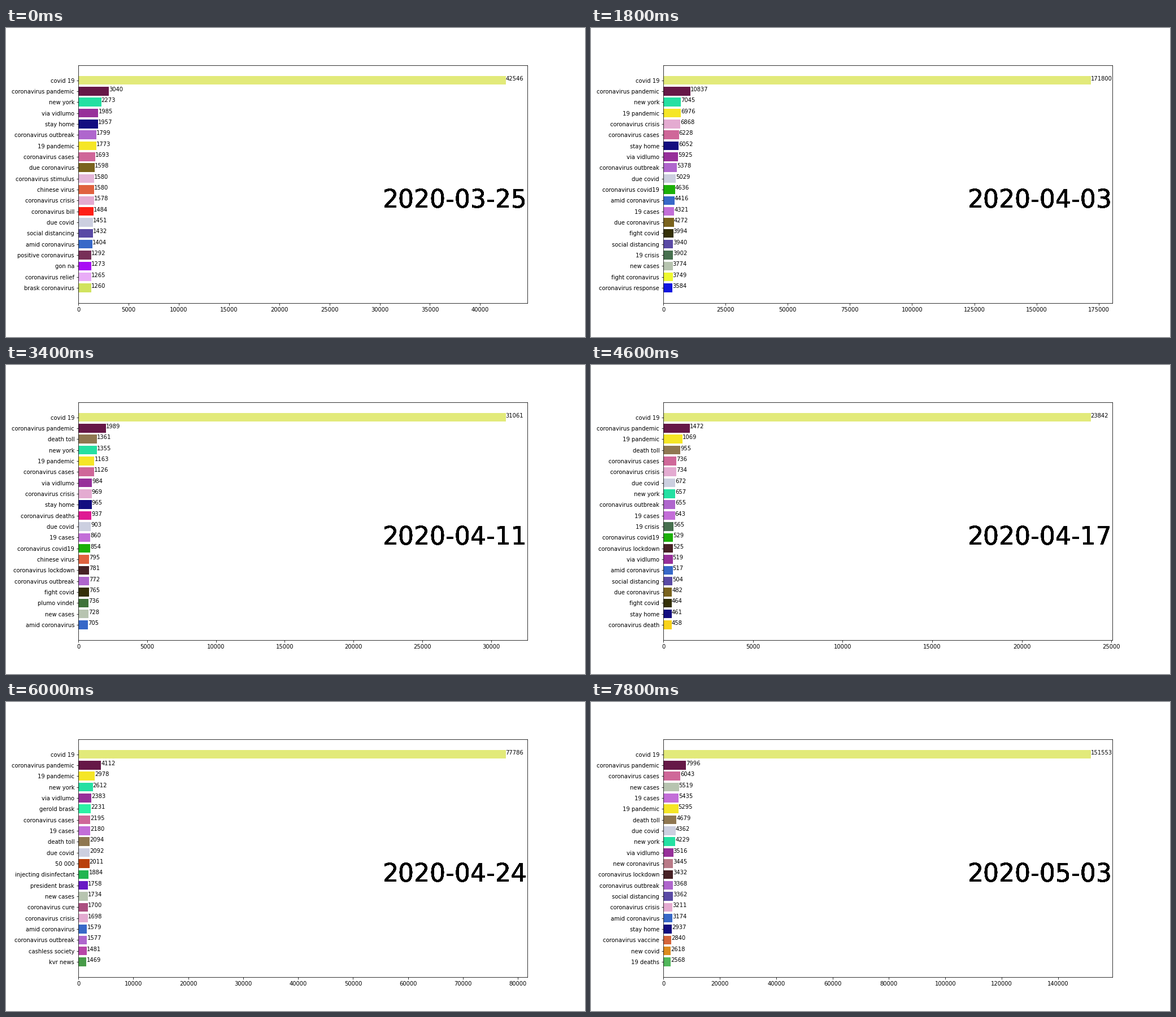
These frames come from a looping animation (1025x547 px, 8000 ms). A matplotlib script:

```python
import matplotlib.pyplot as plt
import numpy as np
from matplotlib.animation import FuncAnimation

WIDTH, HEIGHT, DPI = 1025, 547, 72
DAYS, STEP_MS = 40, 200
ROWS = 20
LEADER = "covid 19"
START = np.datetime64("2020-03-25")

plt.rcParams.update({"font.family": "DejaVu Sans", "font.size": 10})

COLORS = {
    "covid 19": "#e2ea7a",
    "coronavirus pandemic": "#661847",
    "new york": "#24e0a2",
    "via vidlumo": "#97309a",
    "stay home": "#130d80",
    "coronavirus outbreak": "#af66cd",
    "19 pandemic": "#f5e626",
    "coronavirus cases": "#cf6799",
    "due coronavirus": "#7a631d",
    "coronavirus stimulus": "#e5b6d9",
    "chinese virus": "#e0623f",
    "coronavirus crisis": "#e4abd1",
    "coronavirus bill": "#fe1f17",
    "due covid": "#cccfe0",
    "social distancing": "#5a4aa5",
    "amid coronavirus": "#3768c8",
    "positive coronavirus": "#772f58",
    "gon na": "#a80cf5",
    "coronavirus relief": "#e9acf7",
    "brask coronavirus": "#d1e35f",
    "coronavirus covid19": "#1bb008",
    "fight coronavirus": "#eef82f",
    "coronavirus lockdown": "#472226",
    "must act": "#4f0c9c",
    "deliver copy": "#73617f",
    "copy officials": "#5e518a",
    "signing must": "#fd701f",
    "19 cases": "#c36ed8",
    "fight covid": "#343007",
    "19 crisis": "#47704f",
    "new cases": "#b7c4b0",
    "coronavirus response": "#1116e0",
    "death toll": "#8f7751",
    "coronavirus deaths": "#df1a93",
    "plumo vindel": "#3f7339",
    "coronavirus death": "#f8d31a",
    "gerold brask": "#2bf1a4",
    "50 000": "#b93f0a",
    "injecting disinfectant": "#22b551",
    "president brask": "#681bc4",
    "coronavirus cure": "#ab5080",
    "cashless society": "#b846a8",
    "kvr news": "#479b48",
    "new coronavirus": "#b97a88",
    "coronavirus vaccine": "#d5653a",
    "new covid": "#dc8b1d",
    "19 deaths": "#51b75b",
}

# Phrase counts on survey days, keyed by days since the start.
SURVEYS = {
    0: {
        "covid 19": 42546, "coronavirus pandemic": 3040, "new york": 2273,
        "via vidlumo": 1985, "stay home": 1957, "coronavirus outbreak": 1799,
        "19 pandemic": 1773, "coronavirus cases": 1693,
        "due coronavirus": 1598, "coronavirus stimulus": 1580,
        "chinese virus": 1580, "coronavirus crisis": 1578,
        "coronavirus bill": 1484, "due covid": 1451,
        "social distancing": 1432, "amid coronavirus": 1404,
        "positive coronavirus": 1292, "gon na": 1273,
        "coronavirus relief": 1265, "brask coronavirus": 1260,
    },
    5: {
        "covid 19": 159404, "coronavirus pandemic": 10132, "new york": 6932,
        "coronavirus outbreak": 6455, "stay home": 6453,
        "coronavirus cases": 6382, "19 pandemic": 6204, "via vidlumo": 5958,
        "coronavirus crisis": 5554, "social distancing": 5396,
        "amid coronavirus": 4951, "due covid": 4635,
        "coronavirus covid19": 4549, "due coronavirus": 4519,
        "fight coronavirus": 4321, "coronavirus lockdown": 4051,
        "must act": 4047, "deliver copy": 4033, "copy officials": 4025,
        "signing must": 4000,
    },
    9: {
        "covid 19": 171800, "coronavirus pandemic": 10837, "new york": 7045,
        "19 pandemic": 6976, "coronavirus crisis": 6868,
        "coronavirus cases": 6228, "stay home": 6052, "via vidlumo": 5925,
        "coronavirus outbreak": 5378, "due covid": 5029,
        "coronavirus covid19": 4636, "amid coronavirus": 4416,
        "19 cases": 4321, "due coronavirus": 4272, "fight covid": 3994,
        "social distancing": 3940, "19 crisis": 3902, "new cases": 3774,
        "fight coronavirus": 3749, "coronavirus response": 3584,
    },
    17: {
        "covid 19": 31061, "coronavirus pandemic": 1989, "death toll": 1361,
        "new york": 1355, "19 pandemic": 1163, "coronavirus cases": 1126,
        "via vidlumo": 984, "coronavirus crisis": 969, "stay home": 965,
        "coronavirus deaths": 937, "due covid": 903, "19 cases": 860,
        "coronavirus covid19": 854, "chinese virus": 795,
        "coronavirus lockdown": 781, "coronavirus outbreak": 772,
        "fight covid": 765, "plumo vindel": 736, "new cases": 728,
        "amid coronavirus": 705,
    },
    23: {
        "covid 19": 23842, "coronavirus pandemic": 1472, "19 pandemic": 1069,
        "death toll": 955, "coronavirus cases": 736,
        "coronavirus crisis": 734, "due covid": 672, "new york": 657,
        "coronavirus outbreak": 655, "19 cases": 643, "19 crisis": 565,
        "coronavirus covid19": 529, "coronavirus lockdown": 525,
        "via vidlumo": 519, "amid coronavirus": 517,
        "social distancing": 504, "due coronavirus": 482,
        "fight covid": 464, "stay home": 461, "coronavirus death": 458,
    },
    30: {
        "covid 19": 77786, "coronavirus pandemic": 4112, "19 pandemic": 2978,
        "new york": 2612, "via vidlumo": 2383, "gerold brask": 2231,
        "coronavirus cases": 2195, "19 cases": 2180, "death toll": 2094,
        "due covid": 2092, "50 000": 2011, "injecting disinfectant": 1884,
        "president brask": 1758, "new cases": 1734,
        "coronavirus cure": 1700, "coronavirus crisis": 1698,
        "amid coronavirus": 1579, "coronavirus outbreak": 1577,
        "cashless society": 1481, "kvr news": 1469,
    },
    39: {
        "covid 19": 151553, "coronavirus pandemic": 7996,
        "coronavirus cases": 6043, "new cases": 5519, "19 cases": 5435,
        "19 pandemic": 5295, "death toll": 4679, "due covid": 4362,
        "new york": 4229, "via vidlumo": 3516, "new coronavirus": 3445,
        "coronavirus lockdown": 3432, "coronavirus outbreak": 3368,
        "social distancing": 3362, "coronavirus crisis": 3211,
        "amid coronavirus": 3174, "stay home": 2937,
        "coronavirus vaccine": 2840, "new covid": 2618, "19 deaths": 2568,
    },
}

survey_days = list(SURVEYS)
log_peaks = [np.log(counts[LEADER]) for counts in SURVEYS.values()]


def share(counts, term):
    """Count relative to the leader; unlisted terms sit below the last row."""
    return counts.get(term, 0.85 * min(counts.values())) / counts[LEADER]


shares = {term: [share(c, term) for c in SURVEYS.values()] for term in COLORS}


def ranking(day):
    peak = np.exp(np.interp(day, survey_days, log_peaks))
    counts = [(term, int(round(peak * np.interp(day, survey_days, s))))
              for term, s in shares.items()]
    return sorted(counts, key=lambda item: -item[1])[:ROWS]


fig, ax = plt.subplots(figsize=(WIDTH / DPI, HEIGHT / DPI), dpi=DPI)
fig.subplots_adjust(left=0.125, right=0.9, bottom=0.11, top=0.88)


def draw(day):
    ax.clear()
    terms, counts = zip(*reversed(ranking(day)))
    ax.barh(terms, counts, color=[COLORS[t] for t in terms])
    label = str(START + day)
    for row, count in enumerate(counts):
        ax.text(count, row, str(count))
        # Stacking the date once per row hardens its edges.
        ax.text(1, 0.4, label, transform=ax.transAxes, size=44, ha="right")


anim = FuncAnimation(fig, draw, frames=DAYS, interval=STEP_MS,
                     init_func=lambda: None, repeat=True, repeat_delay=0)
plt.show()
```
